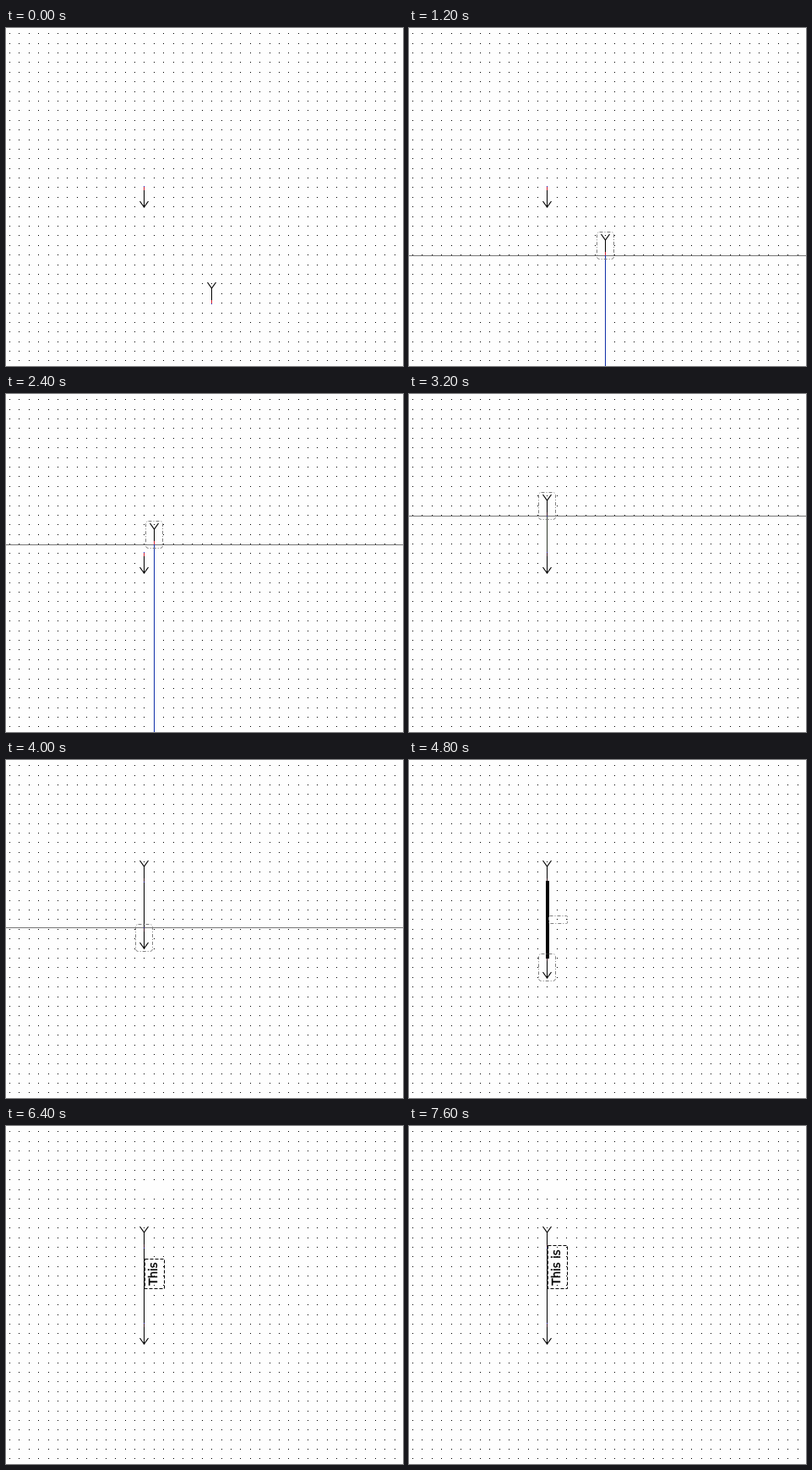
Recreate the animation shown at these times as an HTML page with a canvas. Size 470 by 400 pixels, loop 8000 ms.

```html
<!DOCTYPE html>
<html lang="en">
<head>
<meta charset="utf-8">
<title>Drawing an arrow</title>
<style>
html, body { margin: 0; width: 100%; height: 100%; overflow: hidden; background: #fefefe; }
canvas { display: block; width: 470px; height: 400px; }
</style>
</head>
<body>
<canvas id="stage" width="470" height="400"></canvas>
<script>
const ctx = document.getElementById('stage').getContext('2d');
const W = 470, H = 400, LOOP = 8000, STEP = 400;
const PITCH = 11.39, AXIS = 163;
const INK = '#000', GUIDE = '#767676', FRAME = '#808080';

// Position of the tail's lower joint at the start of each step
const tailPath = [
  [0, 243, 326], [3, 232, 269], [4, 209, 269], [5, 197, 223],
  [6, 175, 178], [7, 175, 155], [8, AXIS, 144]
];
// Position of the arrow's upper joint
const headPath = [[0, AXIS, 187], [9, AXIS, 224], [10, AXIS, 198], [11, AXIS, 233]];
const label = 'This is';

const at = (path, step) => path.filter(p => p[0] <= step).pop();

function rect(x, y, w, h, color) {
  ctx.fillStyle = color;
  ctx.fillRect(x, y, w, h);
}

function chevron(x, y, h) {
  ctx.beginPath();
  ctx.moveTo(x - 4.5, y - h);
  ctx.lineTo(x + 0.5, y);
  ctx.lineTo(x + 5.5, y - h);
  ctx.strokeStyle = INK;
  ctx.lineWidth = 1.2;
  ctx.stroke();
}

function outline(x, y, w, h, radius, dash, color) {
  ctx.beginPath();
  ctx.roundRect(x + 0.5, y + 0.5, w - 1, h - 1, radius);
  ctx.setLineDash(dash);
  ctx.strokeStyle = color;
  ctx.lineWidth = 1;
  ctx.stroke();
  ctx.setLineDash([]);
}

const selection = (x, y) => outline(x - 10, y, 21, 33, 3, [4, 2, 1, 2], FRAME);

function grid(step) {
  for (let r = 0; r < 35; r++) {
    for (let c = 0; c < 41; c++) {
      const hidden = step >= 14 && r === 6 && c >= 14 && c <= 16;
      if (!hidden) rect(Math.round(4 + c * PITCH), Math.round(6.23 + r * PITCH), 1, 1, INK);
    }
  }
}

// Red end piece with a blue docking point; dark once a wire covers it
function joint(x, y, top, wired) {
  rect(x, top, 1, 4, wired ? '#301018' : '#d02030');
  rect(x, y, 1, 1, wired ? '#2828b0' : '#2030d0');
}

function tail(x, y, wired) {
  chevron(x, y - 18, 7);
  rect(x, y - 18, 1, 18, INK);
  joint(x, y, y - 4, wired);
}

function head(x, y, wired) {
  rect(x, y, 1, 25, INK);
  chevron(x, y + 25, 7);
  joint(x, y, y + 1, wired);
}

function typed(count) {
  const top = [184, 177, 169, 165, 157, 153, 149, 141][count];
  outline(164, top, 24, 193 - top, 0, [4, 2], INK);
  ctx.save();
  ctx.translate(179, 188.5);
  ctx.rotate(-Math.PI / 2);
  ctx.font = '13.33px "DejaVu Sans", sans-serif';
  ctx.fillStyle = ctx.strokeStyle = INK;
  ctx.lineWidth = 0.35;
  ctx.fillText(label.slice(0, count), 0, 0);
  ctx.strokeText(label.slice(0, count), 0, 0);
  ctx.restore();
}

function draw(step) {
  const [, tx, ty] = at(tailPath, step);
  const [, hx, hy] = at(headPath, step);
  const dragTail = step >= 3 && step <= 8;
  const dragHead = step >= 9 && step <= 11;
  const wired = step >= 8;

  rect(0, 0, W, H, '#fefefe');
  grid(step);

  if (dragTail) rect(0, ty, W, 1, GUIDE);
  if (dragHead) rect(0, hy, W, 1, GUIDE);
  if (dragTail && !wired) rect(tx, ty, 1, H - ty, '#1030a8');

  if (wired) rect(AXIS, ty, 1, hy - ty, step === 8 ? '#30382c' : INK);

  tail(tx, ty, wired);
  head(hx, hy, wired);
  if (step === 12 || step === 13) rect(162, 143, 4, 92, INK);

  if (step >= 1 && step <= 9) selection(tx, ty - 28);
  if (step >= 9 && step <= 12) selection(hx, hy - 4);

  if (step === 12) outline(165, 184, 23, 10, 1, [4, 2, 1, 2], FRAME);
  if (step === 13) outline(165, 184, 23, 10, 0, [4, 2], INK);
  if (step >= 14) typed(Math.min(step - 12, label.length));
}

const start = performance.now();
function tick() {
  const t = (performance.now() - start) % LOOP;
  draw(Math.floor(t / STEP));
  requestAnimationFrame(tick);
}
draw(0);
requestAnimationFrame(tick);
</script>
</body>
</html>
```
